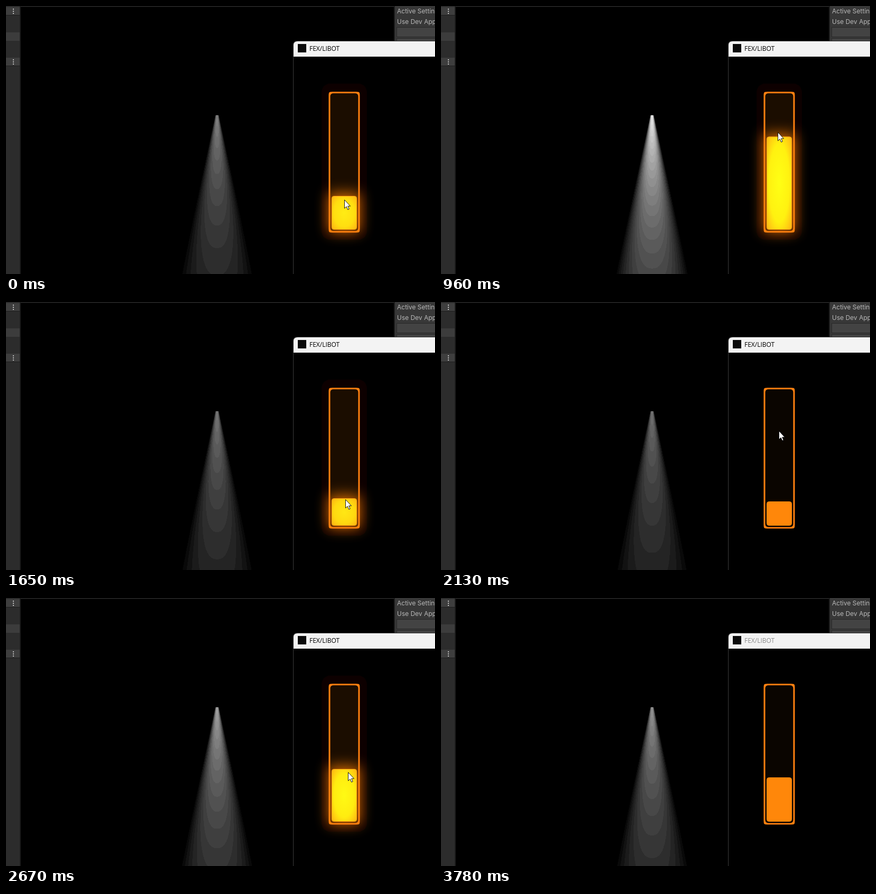
These frames come from a looping animation (813 px wide and 508 px high, 3.8 s). An HTML page with a canvas:

```html
<!DOCTYPE html>
<html lang="en">
<head>
<meta charset="utf-8">
<title>Fader and light cone</title>
<style>
html, body { margin: 0; width: 100%; height: 100%; overflow: hidden; background: #000; }
canvas, svg { position: absolute; left: 0; top: 0; }
canvas { left: 328px; top: 207px; }
.panel { font: 12px Inter, Roboto, sans-serif; fill: #b8b8b8; }
#title { font: 12px "Open Sans", "Noto Sans", sans-serif; }
</style>
</head>
<body>
<canvas id="cone" width="144" height="301"></canvas>
<svg width="813" height="508" viewBox="0 0 813 508">
  <defs>
    <filter id="soft"><feGaussianBlur stdDeviation="1.5"/></filter>
    <filter id="wide" filterUnits="userSpaceOnUse" x="545" y="97" width="268" height="411"><feGaussianBlur stdDeviation="13"/></filter>
    <radialGradient id="lit" r="0.7">
      <stop id="core" offset="0"/>
      <stop id="mid" offset="0.6"/>
      <stop offset="1" stop-color="#ffb414"/>
    </radialGradient>
  </defs>

  <!-- editor panels -->
  <rect width="26" height="508" fill="#2c2c2c"/>
  <rect y="2" width="26" height="15" fill="#3e3e3e"/>
  <rect y="50" width="26" height="16" fill="#3c3c3c"/>
  <rect y="98" width="26" height="15" fill="#3e3e3e"/>
  <path d="M0 17.5H26M0 113.5H26" stroke="#1c1c1c"/>
  <path d="M14 5v2m0 2v2m0 2v2M14 101v2m0 2v2m0 2v2" stroke="#c4c4c4" stroke-width="2"/>
  <rect x="26" width="2" height="508" fill="#1b1b1b"/>
  <rect x="28" width="708" height="1.5" fill="#2a2a2a"/>
  <rect x="735" width="2" height="66" fill="#1b1b1b"/>
  <rect x="737" width="76" height="66" fill="#383838"/>
  <g fill="#434343" stroke="#292929">
    <rect x="740.5" y="40.5" width="80" height="18"/>
    <rect x="740.5" y="61.5" width="80" height="18"/>
  </g>
  <g class="panel">
    <text x="741" y="14">Active Settin</text>
    <text x="741" y="34">Use Dev App</text>
  </g>

  <!-- control window -->
  <path d="M544 508V74q0-8 8-8H813V508Z" fill="#3a3a3a"/>
  <path d="M545 96V74q0-7 8-7H813V96Z" fill="#f3f3f3"/>
  <rect x="545" y="96" width="268" height="412"/>
  <rect x="553" y="72" width="16" height="16" fill="#0b0b0b"/>
  <text id="title" x="575" y="85">FEX/LIBOT</text>

  <!-- fader -->
  <rect id="halo" x="598" y="147" width="86" height="296" rx="16" fill="#0b0500" filter="url(#soft)"/>
  <rect x="611.7" y="162.7" width="58.6" height="266.6" rx="4" fill="#ff8010"/>
  <rect id="well" x="614.3" y="165.3" width="53.4" height="261.4" rx="6"/>
  <rect id="glow" x="611" width="60" fill="#ff8000" opacity="0.8" filter="url(#wide)"/>
  <rect x="613" y="164" width="56" height="264" rx="5" fill="none" stroke="#ff8010" stroke-width="2.6"/>
  <rect id="bar" x="617.5" width="47" rx="4"/>
  <path id="cursor" d="M.5 .5V16.5L4.2 13.2 6.7 19 9.2 18 6.7 12.3H11.5Z" fill="#fff" stroke="#000" stroke-width="0.9"/>
</svg>
<script>
const $ = id => document.getElementById(id);
const LOOP = 3800, FLOOR = 424, LEAD = 50;

// Eased curve through [time, value] points.
function curve(...points) {
  return t => {
    const i = points.findIndex(p => p[0] > t);
    if (i < 0) return points.at(-1)[1];
    const [t0, a] = points[i - 1] || points[0], [t1, b] = points[i];
    const k = t1 > t0 ? (t - t0) / (t1 - t0) : 0;
    return a + (b - a) * (1 - Math.cos(Math.PI * k)) / 2;
  };
}

const barTop = curve([0, 360], [120, 373], [390, 373], [1170, 222], [1620, 372],
  [2130, 378], [2250, 306], [2670, 324], [2820, 340]);
const cursorX = curve([0, 641], [1380, 637], [1650, 643], [2130, 640], [2820, 649], [2970, 705], [3270, 785]);
// How far the cursor strays from the bar after letting go.
const stray = curve([0, 0], [1890, 0], [2130, -109], [2250, 0], [2820, 0], [2970, 104], [3270, 216]);
const isLit = t => t < 2010 || (t >= 2250 && t < 2970);

// The picture is held for a while: [phase start, mean hold], snapped to 30 ms.
const phases = [[0, 137.5], [1650, 120], [2250, 145.7]];
function hold(t) {
  const [from, gap] = phases.findLast(p => p[0] <= t);
  const start = n => from + Math.floor((n * gap + 6) / 30) * 30;
  let n = 0;
  while (start(n + 1) <= t) n++;
  return start(n);
}

const ctx = $('cone').getContext('2d');
const { width: W, height: H } = ctx.canvas;
const img = ctx.createImageData(W, H);

// Light fades down the axis and towards the sides, in grey bands.
function drawCone(power) {
  const step = 9;
  for (let y = 0, i = 0; y < H; y++) {
    const t = y / H, half = 3.5 + 65.5 * t;
    const axis = power * Math.exp(-1.17 * t);
    for (let x = 0; x < W; x++, i += 4) {
      const u = Math.min(1, Math.abs(x + 0.5 - W / 2) / half);
      const v = Math.round(axis * (1 - u ** 2.5) / step) * step;
      img.data[i] = img.data[i + 1] = img.data[i + 2] = v;
      img.data[i + 3] = 255;
    }
  }
  ctx.putImageData(img, 0, 0);
}

function set(id, attrs) {
  for (const k in attrs) $(id).setAttribute(k, attrs[k]);
}

function draw(t) {
  const top = barTop(t), height = FLOOR - top, lit = isLit(t);
  const green = Math.min(255, 210 + height * 0.4);
  const visibility = lit ? 'visible' : 'hidden';
  drawCone(72 + 0.93 * height);
  set('bar', { y: top + 0.5, height: height - 1, fill: lit ? 'url(#lit)' : '#ff870a', stroke: lit ? '#ffa014' : '#ff870a' });
  set('core', { 'stop-color': `rgb(255,${green},20)` });
  set('mid', { 'stop-color': `rgb(255,${green - 14},16)` });
  set('glow', { y: top - 5, height: height + 10, visibility });
  set('halo', { visibility });
  set('well', { fill: lit ? '#1b0d00' : '#0a0500' });
  set('cursor', { transform: `translate(${Math.round(cursorX(t))} ${Math.round(barTop(t + LEAD) + 2 + stray(t))})` });
}

let shown;
function frame() {
  const t = performance.now() % LOOP, held = hold(t);
  if (held !== shown) draw(shown = held);
  set('title', { fill: t < 3780 ? '#000' : '#8c8c8c' });
  requestAnimationFrame(frame);
}
frame();
</script>
</body>
</html>
```
